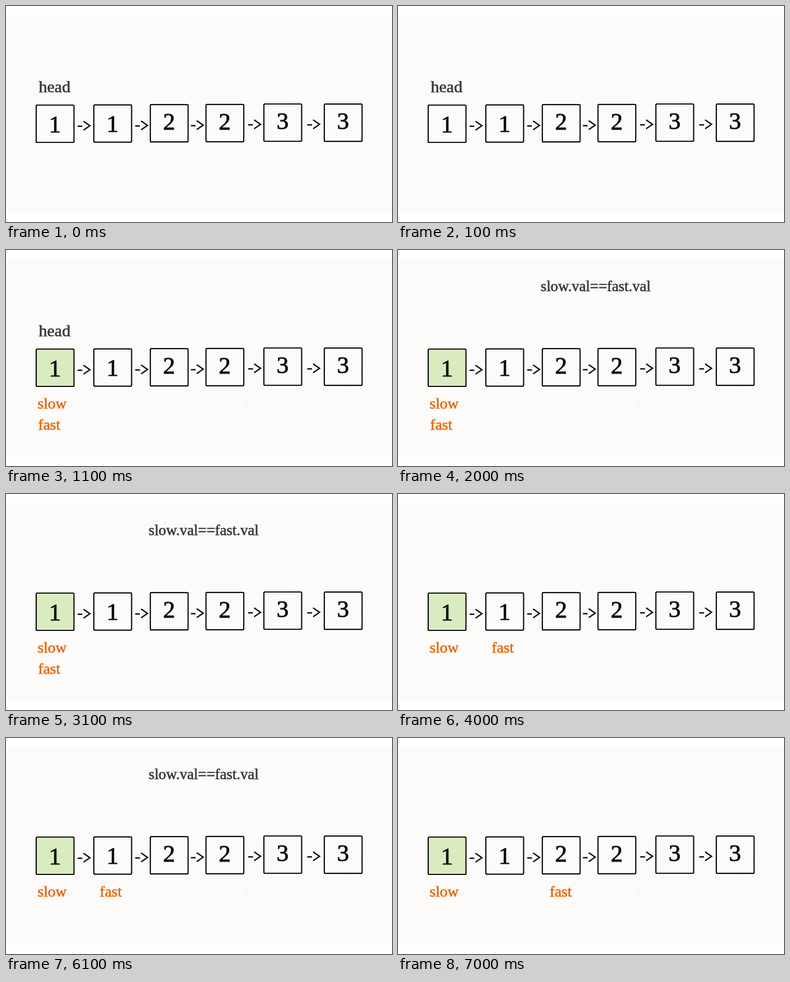
These frames come from a looping animation (690 px wide and 388 px high, 8000 ms). An HTML page:

```html
<!DOCTYPE html>
<html lang="en">
<head>
<meta charset="utf-8">
<title>Linked list: slow and fast pointers</title>
<style>
  html, body { margin: 0; width: 100%; height: 100%; overflow: hidden; background: #fff; }
  svg { display: block; width: 690px; height: 388px; }
  text { font-family: "Liberation Serif", serif; stroke-width: .7; }
  .note { fill: #3a3a3a; stroke: #3a3a3a; }
  .pointer { fill: #e8690b; stroke: #e8690b; font-size: 27.5px; }
  .digit { font-size: 43px; text-anchor: middle; fill: #0b0b0b; stroke: #0b0b0b; stroke-width: .9; }
  .arrow { fill: none; stroke: #111; stroke-width: 2.4; }
  .box { fill: none; stroke: #0e0e0e; stroke-width: 2.2; }
</style>
</head>
<body>
<svg viewBox="0 0 690 388">
  <rect y="16" width="690" height="356" fill="#fcfbfa"/>
  <g id="paper" stroke="#e6e3df" stroke-linecap="round"></g>
  <rect id="highlight" x="54.5" y="178.5" width="67" height="66" fill="#d9ecc0"/>
  <g id="list"></g>
  <text id="head" class="note" x="58.5" y="155" font-size="30">head</text>
  <text id="test" class="note" x="255" y="74" font-size="26.8">slow.val==fast.val</text>
  <text id="slow" class="pointer" x="56.5" y="285">slow</text>
  <text id="fast" class="pointer">fast</text>
</svg>
<script>
const $ = id => document.getElementById(id);

function add(parent, tag, attributes, content = "") {
  const node = document.createElementNS("http://www.w3.org/2000/svg", tag);
  for (const key in attributes) node.setAttribute(key, attributes[key]);
  node.textContent = content;
  parent.append(node);
}

let seed = 7;
const random = () => (seed = seed * 16807 % 2147483647) / 2147483647;

// Faint paper fibres
for (let i = 0; i < 130; i++) {
  const x = random() * 690, y = 20 + random() * 346;
  const dx = random() * 4 - 2, dy = random() * 3 - 1.5;
  add($("paper"), "path", {
    d: `M${x} ${y}l${dx} ${dy}`,
    "stroke-width": .6 + random() * .8,
    opacity: .3 + random() * .6
  });
}

// Box left and top, digit, digit baseline
const nodes = [
  [54, 178, 1, 226.5], [157, 177.6, 1, 226], [258, 177.2, 2, 221.5],
  [357.5, 176.8, 2, 221.5], [461, 176, 3, 220.5], [569, 176.2, 3, 220.5]
];
// Left end and middle of each arrow
const arrows = [[128, 215], [231, 214.5], [330.5, 214], [433, 212.5], [538.5, 212.5]];

for (const [x, y, digit, baseline] of nodes) {
  add($("list"), "rect", { class: "box", x, y, width: 67.5, height: 67, rx: 1.8 });
  add($("list"), "text", { class: "digit", x: x + 33.5, y: baseline }, digit);
}
for (const [x, y] of arrows) {
  add($("list"), "path", { class: "arrow", d: `M${x} ${y + 1}h8.5M${x + 10.5} ${y - 8}l11.5 8-11.5 8` });
}

const show = (id, visible) => $(id).setAttribute("visibility", visible ? "visible" : "hidden");

function draw(now) {
  const second = Math.floor(now / 1000) % 8;
  const started = second >= 1;
  show("head", second < 2);
  show("highlight", started);
  show("slow", started);
  show("fast", started);
  show("test", [2, 3, 5, 6].includes(second));

  const [x, y] = second < 4 ? [57.5, 323] : second < 7 ? [167.5, 285] : [271, 285];
  $("fast").setAttribute("x", x);
  $("fast").setAttribute("y", y);
  requestAnimationFrame(draw);
}
draw(performance.now());
</script>
</body>
</html>
```
